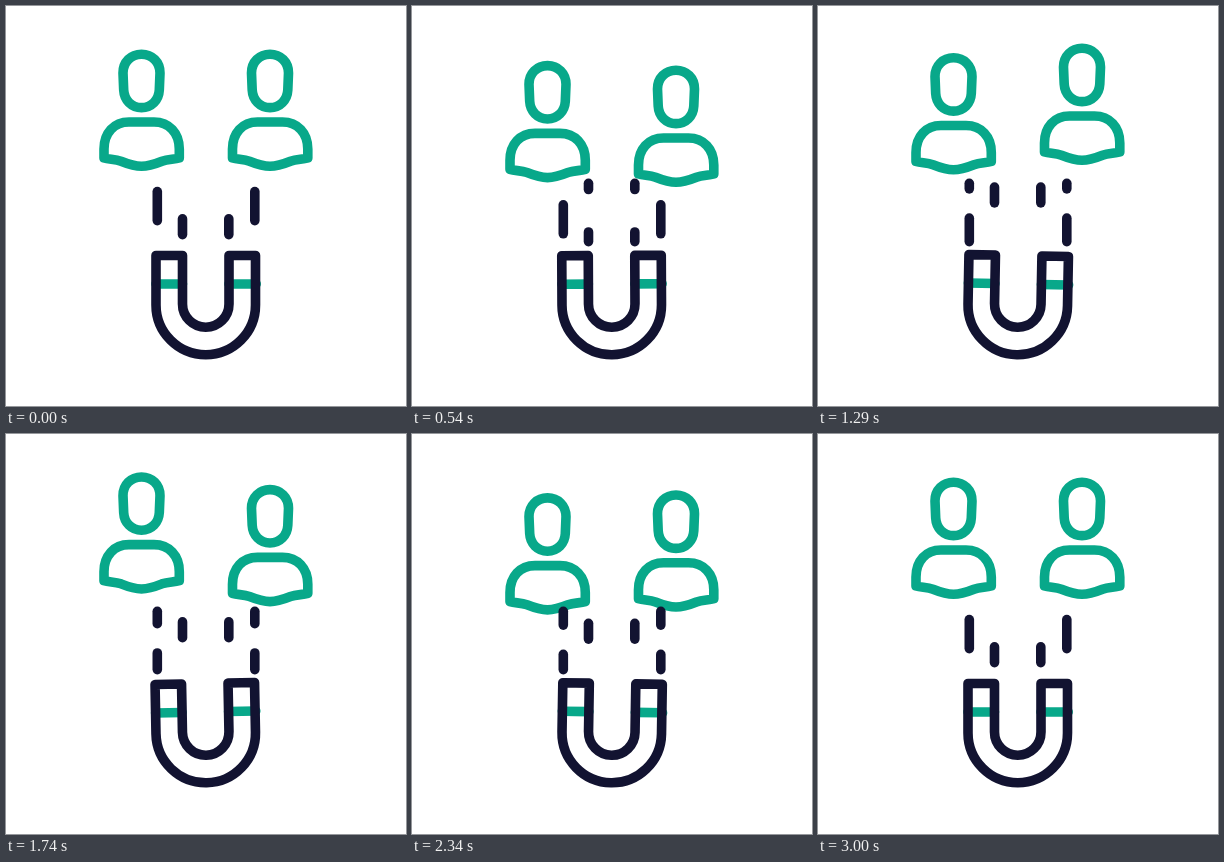
Animation of 400x400 px, one loop 3590 ms. Source, as an HTML page with a canvas:

```html
<!DOCTYPE html>
<html lang="en">
<head>
<meta charset="utf-8">
<title>Magnet</title>
<style>
  html, body { margin: 0; width: 100%; height: 100%; overflow: hidden; background: #fff; }
  canvas { display: block; width: 100vmin; height: 100vmin; margin: 0 auto; }
</style>
</head>
<body>
<canvas id="stage"></canvas>
<script>
const LOOP = 3590, MOVE = 3000, STEP = 30;
const GREEN = '#08a88a', NAVY = '#121331';
const canvas = document.getElementById('stage');
const ctx = canvas.getContext('2d');
const scale = window.devicePixelRatio || 1;
canvas.width = canvas.height = 400 * scale;

const head = new Path2D(
  'M117 67 C117 56 125 48.3 135.5 48.3 C146 48.3 154 56 154 67' +
  ' L153.3 84 C152.8 94 145.5 101.6 135.5 101.6 C125.5 101.6 118.2 94 117.7 84 Z');
const body = new Path2D(
  'M98 152 V143 C98 127 108 116 123 116 H148 C163 116 173.3 127 173.3 143 V152' +
  ' C168 153.6 162 153 156 155.2 C149 158 143 160.3 135.5 160.3' +
  ' C128 160.3 122 158 115 155.2 C109 153 103 153.6 98 152 Z');
const magnet = new Path2D(
  'M150 249.5 H176.5 V298 A23.25 23.25 0 0 0 223 298 V249.5 H249.5' +
  ' V299 A49.75 49.75 0 0 1 150 299 Z');
const bands = new Path2D('M150 278 H176.5 M223 278 H250.2');

// Times and vertical offsets of each bobbing figure
const leftBob = [[0, 0], [840, 16], [1665, -6], [2400, 16], [MOVE, 0]];
const rightBob = [[0, 0], [540, 16], [1300, -6], [2070, 16], [MOVE, 0]];

function bob(keys, t) {
  let i = 1;
  while (i < keys.length - 1 && t > keys[i][0]) i++;
  const [t0, a] = keys[i - 1], [t1, b] = keys[i];
  const u = (t - t0) / (t1 - t0);
  return a + (b - a) * u * u * (3 - 2 * u);
}

function bezier(x1, y1, x2, y2) {
  const at = (s, a, b) => 3 * (1 - s) ** 2 * s * a + 3 * (1 - s) * s * s * b + s ** 3;
  return x => {
    if (x <= 0) return 0;
    if (x >= 1) return 1;
    let lo = 0, hi = 1;
    for (let i = 0; i < 30; i++) {
      const mid = (lo + hi) / 2;
      if (at(mid, x1, x2) < x) lo = mid; else hi = mid;
    }
    return at(lo, y1, y2);
  };
}
const flow = bezier(0.2, 0.1, 0.54, 1);

function person(dx, dy) {
  ctx.save();
  ctx.translate(dx, dy);
  ctx.strokeStyle = GREEN;
  ctx.stroke(head);
  ctx.stroke(body);
  ctx.restore();
}

// A dash that leaves the bottom of its track and re-enters at the top
function dash(x, start, length) {
  const top = 177.3, track = 58.3;
  const from = ((start % track) + track) % track;
  const to = from + length;
  const piece = (a, b) => {
    if (b - a < 0.05) return;
    ctx.beginPath();
    ctx.moveTo(x, top + a);
    ctx.lineTo(x, top + b);
    ctx.stroke();
  };
  piece(from, Math.min(to, track));
  if (to > track) piece(0, to - track);
}

function draw(t) {
  ctx.setTransform(scale, 0, 0, scale, 0, 0);
  ctx.fillStyle = '#fff';
  ctx.fillRect(0, 0, 400, 400);
  ctx.lineWidth = 9.6;
  ctx.lineCap = ctx.lineJoin = 'round';

  person(0, bob(leftBob, t));
  person(128.5, bob(rightBob, t));

  const shift = flow(t / MOVE) * 6 * 58.3;
  ctx.strokeStyle = NAVY;
  for (const x of [151.3, 248.8]) dash(x, 8.3 + shift, 29);
  for (const x of [176.5, 222.8]) dash(x, 35.5 + shift, 15.8);

  ctx.save();
  ctx.translate(200, 300);
  ctx.rotate(Math.sin(t / MOVE * 6 * Math.PI) * 1.1 * Math.PI / 180);
  ctx.translate(-200, -300);
  ctx.strokeStyle = GREEN;
  ctx.stroke(bands);
  ctx.strokeStyle = NAVY;
  ctx.stroke(magnet);
  ctx.restore();
}

const begin = performance.now();
function tick() {
  const t = (performance.now() - begin) % LOOP;
  draw(Math.min(MOVE, Math.floor(t / STEP) * STEP));
  requestAnimationFrame(tick);
}
tick();
</script>
</body>
</html>
```
